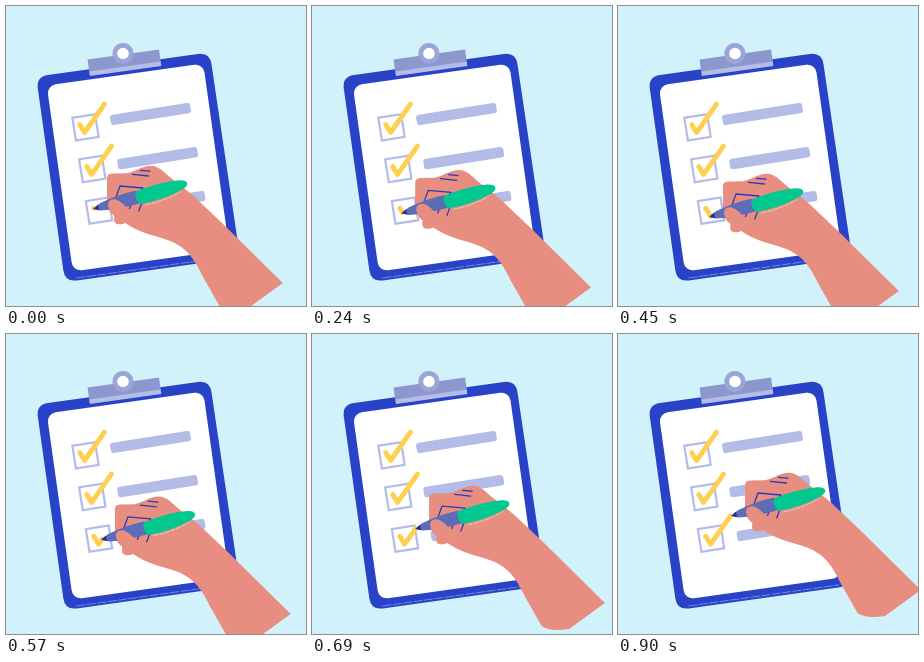
An HTML page that plays this animation: 300x300 px, repeating every 1.53 s.

```html
<!DOCTYPE html>
<html lang="en">
<head>
<meta charset="utf-8">
<title>Checklist</title>
<style>
  html, body { margin: 0; width: 100%; height: 100%; overflow: hidden; background: #d1f1fb; }
  svg { display: block; width: 100%; height: 100%; }
</style>
</head>
<body>
<svg viewBox="0 0 300 300">
  <defs>
    <rect id="box" x="-11.5" y="-11.5" width="23" height="23" transform="rotate(-9)"
          fill="none" stroke="#b3bce8" stroke-width="2.2"/>
    <rect id="bar" x="-40.5" y="-5.3" width="81" height="10.6" rx="3" transform="rotate(-9)" fill="#b2bce7"/>
  </defs>
  <rect width="300" height="300" fill="#d1f1fb"/>

  <g transform="rotate(-8)">
    <path fill="#2843c8" d="M32 74.200H183.300Q195.300 74.200 195.400 86.200L196.700 269.600Q196.700 281.600 184.700 281.600
      H32Q20 281.600 20 269.600V86.200Q20 74.200 32 74.200Z"/>
    <path fill="none" stroke="#8fa0e6" stroke-width="0.7" stroke-dasharray="9 1.500" d="M32 279.200H184"/>
    <rect x="29.3" y="84.5" width="158" height="187.7" rx="9" fill="#fff"/>
    <rect x="73.3" y="64.3" width="72.2" height="13" fill="#8c97cd"/>
    <rect x="73.3" y="76.5" width="72.2" height="4.6" fill="#b3bde8"/>
  </g>
  <circle cx="117" cy="47.5" r="8.2" fill="#fff" stroke="#9ca5d8" stroke-width="4.8"/>

  <use href="#box" x="79.5" y="121.3"/>
  <use href="#box" x="86.3" y="163"/>
  <use href="#box" x="93" y="204.7"/>
  <use href="#bar" x="144.5" y="108"/>
  <use href="#bar" x="151.7" y="152.2"/>
  <use href="#bar" x="159" y="196"/>

  <g id="marks" fill="none" stroke="#ffd04f" stroke-width="4.9" stroke-linecap="round" stroke-linejoin="round"></g>

  <g id="hand">
    <path fill="#e88e80" d="M101 172Q101 167.800 106 167.500L121 167.300C129 165.500 136 159.700 145 159.700
      C153 159.700 158 166.500 165 172C172 177.500 181 184.500 188 190.500L216 217L276.800 277L241 303
      Q222 306 213.500 300L196.500 270C187 250 179 240 160 233.500C146 229 132 226 119 217
      Q116 219 111 218Q107 217 108.500 210Q100 204 101 194Z"/>
    <g fill="none" stroke="#2a3cb4" stroke-width="1.3" stroke-linecap="round" stroke-linejoin="round">
      <path d="M134.500 164.300L144 165.200M126.500 168.300L142.500 170"/>
      <path d="M110 191L114 180L137 182L132.500 188"/>
      <path d="M126 197L123.500 202.500M136 196L132.800 205"/>
    </g>
    <g transform="translate(-0.6 0.5)">
      <path fill="#5d6cb6" d="M88 202.300L94.500 196.800Q112 188 131 184L135 196.500Q114 203 95 204Z"/>
      <path fill="#1f2f9c" d="M87.800 202.400L92.800 198Q92.500 201 94 203.700Z"/>
      <path fill="none" stroke="#cfdccf" stroke-width="0.9" stroke-dasharray="5 1" d="M140 198.300Q160 194.500 176 184.700"/>
      <path fill="#00c88f" d="M130 188Q129.500 185.500 133 184Q154 175.500 174 173.700Q181 173.300 182 177
        Q182 180.500 175 184Q157 193.500 136 197.300Q131.500 197.300 130 188Z"/>
    </g>
    <path fill="#e88e80" d="M102 199Q102 193.500 108 193.300C114 193.300 118 200 126 206L124 219L109 210Q102.500 205 102 199Z"/>
  </g>
</svg>
<script>
  const LOOP = 1530, STEP = 30, TURN = 450, END = 900;
  const DOWN = { x: 4, y: 8 }, UP = { x: 26, y: -21 };
  const KNEE = { x: 4.8, y: 7.8 }, TIP = { x: 24.7, y: -20.5 };
  const hand = document.getElementById("hand");
  const marks = document.getElementById("marks");

  const ease = u => u * u * (3 - 2 * u);
  const mix = (a, b, k) => a + (b - a) * k;

  // Outline of a tick whose short and long strokes are partly drawn.
  function tickPath(down, up) {
    const knee = `M0 0L${KNEE.x * down} ${KNEE.y * down}`;
    return up > 0 ? `${knee}L${mix(KNEE.x, TIP.x, up)} ${mix(KNEE.y, TIP.y, up)}` : knee;
  }

  function addMark(x, y) {
    const mark = document.createElementNS("http://www.w3.org/2000/svg", "path");
    mark.setAttribute("transform", `translate(${x} ${y})`);
    mark.setAttribute("d", tickPath(1, 1));
    marks.append(mark);
    return mark;
  }
  addMark(73.8, 118.7);
  addMark(80.8, 160.6);
  const drawn = addMark(87.8, 202.3);

  function render(time) {
    const t = Math.min(END, Math.floor((time % LOOP) / STEP) * STEP);
    const down = ease(Math.min(1, t / TURN));
    const up = ease(Math.max(0, (t - TURN) / (END - TURN)));
    const x = mix(DOWN.x * down, UP.x, up);
    const y = mix(DOWN.y * down, UP.y, up);
    hand.setAttribute("transform", `translate(${x} ${y})`);
    drawn.setAttribute("d", tickPath(down, up));
  }

  const start = performance.now();
  function frame() {
    render(performance.now() - start);
    requestAnimationFrame(frame);
  }
  frame();
</script>
</body>
</html>
```
